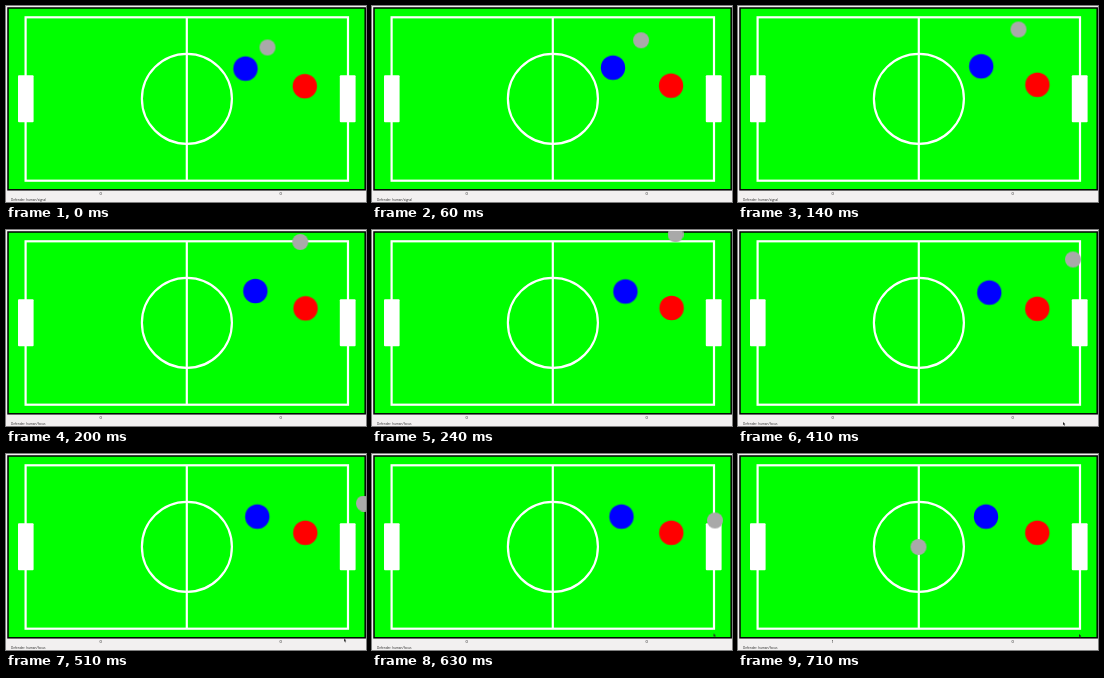
An HTML page for the animation above (770 ms loop, 360x196 px).

```html
<!DOCTYPE html>
<html lang="en">
<head>
<meta charset="utf-8">
<title>Table football</title>
<style>
  html, body { margin: 0; width: 100%; height: 100%; overflow: hidden; background: #f2f0f0; }
  svg { display: block; width: 100%; height: 100%; }
  text { font-family: "Open Sans", sans-serif; fill: #222; }
  .lines { fill: none; stroke: #fff; stroke-width: 2.2; }
  .score { font-size: 4.2px; text-anchor: middle; }
  .status { font-size: 3.1px; }
  .ball, .blue, .red, .cursor, .early, .late, .before, .after { animation: 770ms infinite; }

  .ball { animation-name: ball; }
  @keyframes ball {
    0% { transform: translate(261.5px, 41.5px); animation-timing-function: steps(1); }
    2.5% { transform: translate(265.3px, 37.9px); animation-timing-function: steps(4); }
    18.1% { transform: translate(280.5px, 23.5px); animation-timing-function: steps(5); }
    31.1% { transform: translate(303.5px, 4.3px); animation-timing-function: steps(7); }
    53.2% { transform: translate(335px, 29.5px); animation-timing-function: steps(5); }
    66.2% { transform: translate(358px, 49.5px); animation-timing-function: steps(5); }
    81.8% { transform: translate(343px, 66.5px); animation-timing-function: steps(1); }
    84.4%, 100% { transform: translate(180.5px, 93px); animation-timing-function: steps(1); }
  }

  .blue { animation-name: blue; }
  @keyframes blue {
    0% { transform: translate(239.5px, 62.6px); animation-timing-function: steps(5); }
    18.1% { transform: translate(243.2px, 60.3px); animation-timing-function: steps(5); }
    31.1% { transform: translate(253.4px, 61.5px); animation-timing-function: steps(7); }
    53.2%, 66.2% { transform: translate(251.3px, 62.6px); animation-timing-function: steps(5); }
    81.8% { transform: translate(249.5px, 62.6px); animation-timing-function: steps(4); }
    92.2%, 100% { transform: translate(248px, 62.6px); animation-timing-function: steps(1); }
  }

  .red { animation-name: red; }
  @keyframes red {
    0% { transform: translate(298.8px, 80.2px); animation-timing-function: steps(5); }
    18.1% { transform: translate(299.4px, 78.8px); animation-timing-function: steps(5); }
    31.1% { transform: translate(299.6px, 78px); animation-timing-function: steps(7); }
    53.2%, 100% { transform: translate(299.3px, 78.8px); }
  }

  .cursor { animation-name: cursor; }
  @keyframes cursor {
    0%, 42% { transform: translate(316px, 199px); animation-timing-function: steps(4); }
    53.2% { transform: translate(325px, 192px); animation-timing-function: steps(5); }
    66.2% { transform: translate(338px, 184.5px); animation-timing-function: steps(5); }
    81.8% { transform: translate(341.5px, 179.5px); animation-timing-function: steps(4); }
    92.2%, 100% { transform: translate(341px, 180px); }
  }

  .early { animation-name: early; }
  .late { animation-name: late; }
  .before { animation-name: before; }
  .after { animation-name: after; }
  .early, .late, .before, .after { animation-timing-function: step-end; }
  @keyframes early { 0% { opacity: 1; } 25.9%, 100% { opacity: 0; } }
  @keyframes late { 0% { opacity: 0; } 25.9%, 100% { opacity: 1; } }
  @keyframes before { 0% { opacity: 1; } 84.4%, 100% { opacity: 0; } }
  @keyframes after { 0% { opacity: 0; } 84.4%, 100% { opacity: 1; } }
</style>
</head>
<body>
<svg viewBox="0 0 360 196" preserveAspectRatio="none">
  <clipPath id="pitch"><rect x="1" y="1" width="359" height="184"/></clipPath>

  <rect x="2" y="2" width="357.2" height="181.8" fill="#0f0" stroke="#000" stroke-width="1.5"/>
  <g class="lines">
    <rect x="19.6" y="11.3" width="322.4" height="163.4"/>
    <path d="M180.8 11V175"/>
    <circle cx="180.9" cy="92.8" r="45"/>
  </g>
  <g fill="#fff">
    <rect x="12" y="69.2" width="15.6" height="47" rx="1"/>
    <rect x="333.8" y="69.2" width="15.8" height="47" rx="1"/>
  </g>

  <g clip-path="url(#pitch)">
    <circle class="blue" r="12.2" fill="#00f"/>
    <circle class="red" r="12.2" fill="#f00"/>
    <circle class="ball" r="8" fill="#a9a9a9"/>
  </g>

  <g class="score">
    <text class="before" x="94.8" y="189">0</text>
    <text class="after" x="94.8" y="189">1</text>
    <text x="274.6" y="189">0</text>
  </g>
  <g class="status">
    <text class="early" x="5" y="194.6">Defender: human/signal</text>
    <text class="late" x="5" y="194.6">Defender: human/focus</text>
  </g>

  <path class="cursor" d="M0 0V3.2L.8 2.5 1.5 3.8 2 3.5 1.4 2.3H2.4Z" fill="#222"/>
</svg>
</body>
</html>
```
